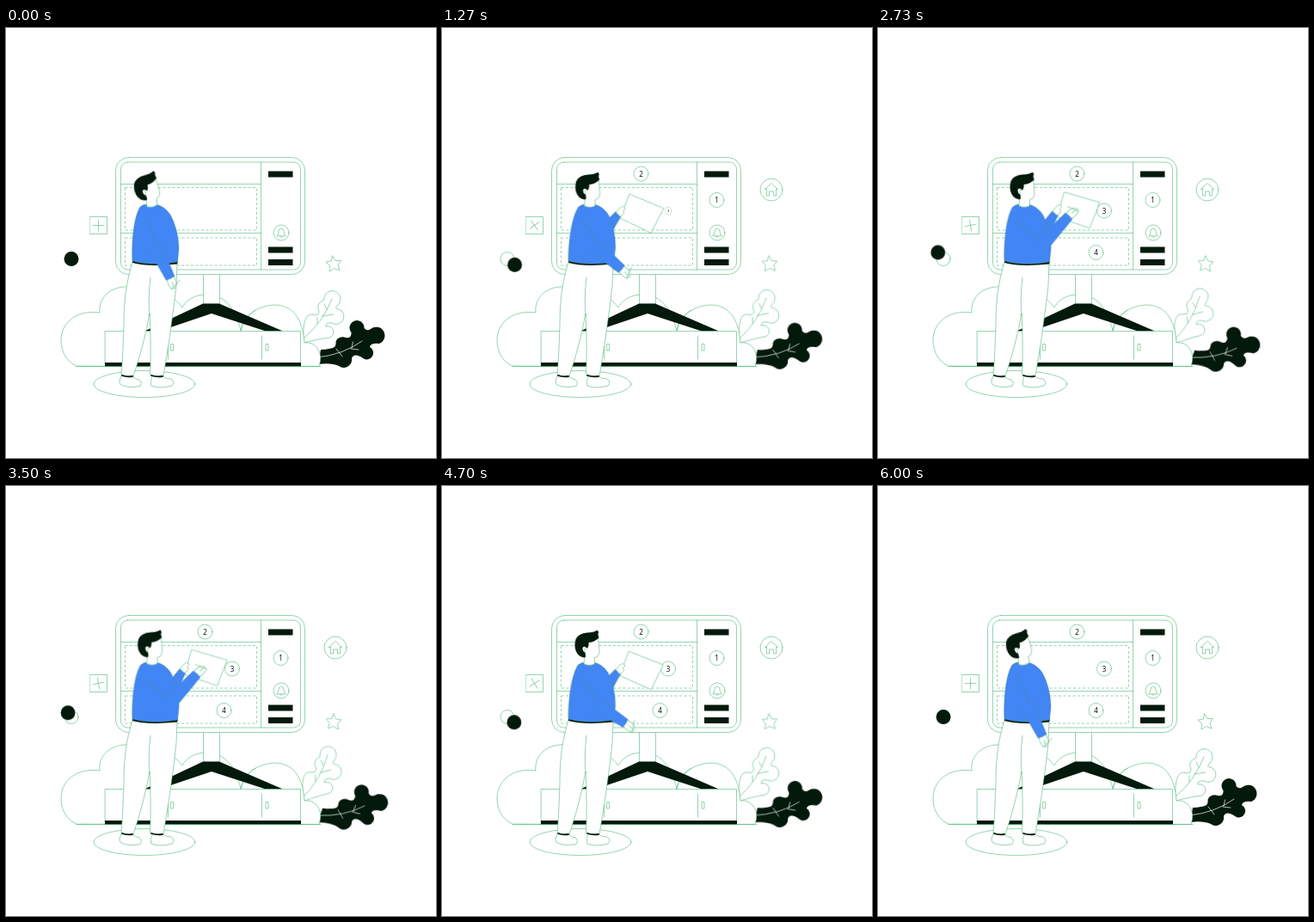
These frames come from a looping animation (500x500 px, 6.03 s). An HTML page without scripts:

```html
<!DOCTYPE html>
<html lang="en">
<head>
<meta charset="utf-8">
<title>Planning a layout</title>
<style>
html, body { margin: 0; width: 100%; height: 100%; overflow: hidden; background: #fff; }
svg { display: block; width: 100%; height: 100%; }
.line { fill: none; stroke: #3bb36b; stroke-width: .55; stroke-linejoin: round; stroke-linecap: round; }
.white { fill: #fff; }
.dark { fill: #02190b; stroke: none; }
.blue { fill: #4285f4; stroke: #3f8f8a; stroke-width: .5; }
.vein { stroke: #fff; stroke-width: .7; }
text { font: 8px "Noto Sans", "Open Sans", sans-serif; fill: #02190b; text-anchor: middle; }

/* everything swings forth and back, half a loop each way */
.sway { animation: 3.015s ease-in-out infinite alternate; }
.leaf { animation-name: leaf; transform-origin: 362px 388px; }
.frond { animation-name: frond; transform-origin: 350px 362px; }
.dot { animation-name: dot; }
.plus { animation-name: plus; transform-origin: 107.5px 229.5px; }
.star { animation-name: star; transform-origin: 381px 273.5px; }
.torso { animation-name: torso; transform-origin: 174px 272px; }
.head { animation-name: head; transform-origin: 168px 203px; }
.hold { animation-name: hold; transform-origin: 178px 230px; }
.write { animation-name: write; }
.seam { animation-name: seam; }

@keyframes leaf { to { transform: rotate(9deg); } }
@keyframes frond { to { transform: rotate(-6deg); } }
@keyframes dot {
  0%, 66.67% { transform: none; }
  33.33% { transform: translate(10px, 8px); }
  100% { transform: translate(-7.5px, -9px); }
}
@keyframes plus {
  0% { transform: none; }
  33.33% { transform: rotate(48deg); }
  60%, 100% { transform: rotate(79deg); }
}
@keyframes star { to { transform: rotate(10deg); } }
@keyframes torso {
  0% { transform: none; }
  27% { transform: skewX(-4.3deg); }
  57.4%, 100% { transform: skewX(-.6deg); }
}
@keyframes head {
  0% { transform: rotate(-11deg); }
  27% { transform: translate(5px, 0) rotate(1deg); }
  57.4% { transform: none; }
  59.7% { transform: translate(-.5px, -1px); }
  100% { transform: translate(1px, 0) rotate(1deg); }
}
@keyframes hold {
  0% { transform: rotate(118deg); animation-timing-function: ease-in; }
  25.5% { transform: rotate(29.5deg); animation-timing-function: linear; }
  28.5% { transform: rotate(18.5deg); animation-timing-function: ease-out; }
  57.4% { transform: none; }
  100% { transform: translate(3px, 2px); }
}
@keyframes write {
  0% { transform: translate(173.6px, 255px) rotate(64deg); }
  27% { transform: translate(171.6px, 256px) rotate(72deg); animation-timing-function: ease-in; }
  57.4% { transform: translate(193px, 251px) rotate(-29deg); animation-timing-function: linear; }
  59.7% { transform: translate(193px, 249.5px) rotate(-40deg); animation-timing-function: ease-out; }
  70% { transform: translate(194.5px, 248px) rotate(-47deg); }
  100% { transform: translate(194.7px, 248px) rotate(-47deg); }
}
@keyframes seam {
  0%, 27% { transform: translate(162px, 222px) rotate(70deg); }
  57.4%, 100% { transform: translate(162px, 226px) rotate(44deg); }
}

.pop { transform-box: fill-box; transform-origin: center; animation: 6.03s linear infinite; }
.one { animation-name: one; }
.two { animation-name: two; }
.three { animation-name: three; }
.four { animation-name: four; }
.home { animation-name: home; }
@keyframes one { 0%, 2.8% { transform: scale(0); } 6.1%, 100% { transform: none; } }
@keyframes two { 0%, 11.1% { transform: scale(0); } 14.4%, 100% { transform: none; } }
@keyframes home { 0%, 16% { transform: scale(0); } 19.4%, 100% { transform: none; } }
@keyframes three { 0%, 19.5% { transform: scale(0); } 22.8%, 100% { transform: none; } }
@keyframes four { 0%, 28% { transform: scale(0); } 31.3%, 100% { transform: none; } }
</style>
</head>
<body>
<svg viewBox="0 0 500 500" class="line">
  <!-- plants and clouds -->
  <g class="sway frond">
    <path class="white" d="M346 366Q344 332 356 333Q364 336 364 329A8 8 0 0 1 369 317Q370 317 370 314A9.5 9.5 0 1 1 386 322Q381 327 387 327A9 9 0 1 1 379 343Q371 342 372 347A6.5 6.5 0 0 1 376 360Q366 361 346 366Z"/>
    <path d="M346 361Q368 343 379 315M362 344V337M368 335L381 333M373 327L370 321"/>
  </g>
  <g class="sway leaf">
    <path class="dark" d="M363 391L366 374Q377 373.500 382 371Q384 369 383.500 365A8 7 0 0 1 395 360Q402 361 401.500 354A8.500 8.500 0 1 1 416.500 349Q420 353 424 350A10 10 0 1 1 434 367Q424 366 423 371A7.500 7.500 0 1 1 416 384.500Q405 377 402 384A9.500 9.500 0 0 1 387 393Q378 389 363 391Z"/>
    <path class="vein" d="M362 383Q392 380 414 364M388 378L384 373M402 372L403.500 365M388 378L391 382M401 373L410 374"/>
  </g>
  <path class="white" d="M82 393C70 388 64 376 64 363C64 343 82 327 109 331C107 315 120 299 145 301C165 301 190 305 205 325C212 312 228 308 240 311C254 313 266 324 273 352C278 334 292 323 312 322C332 322 345 336 347 366C360 364 370 378 364 393Z"/>
  <path d="M273 352C274 342 282 332 290 328"/>

  <!-- stand and cabinet -->
  <path class="white" d="M229.500 286V321H248.500V286Z"/>
  <path class="dark" d="M229 320.500H248L322 352.500H302L239 332L178 352.500H161Z"/>
  <path class="white" d="M115.500 352.500H342.500V391H115.500Z"/>
  <path class="dark" d="M115 389H343V393.500H115Z"/>
  <path d="M188.500 358V385M297.500 358V385M192 367.500H194.500V375H192ZM302.500 367.500H305V375H302.500ZM82 393.500H366"/>

  <!-- screen -->
  <rect class="white" x="127.500" y="150.500" width="220" height="136" rx="15"/>
  <rect x="133.500" y="156" width="209" height="125" rx="8"/>
  <path d="M296.500 156V281M133.500 181.500H296.500M133.500 238.500H296.500"/>
  <path stroke-dasharray="3 2.500" stroke-linecap="butt" d="M138.500 185.500H291.500V235H138.500ZM138.500 244H291.500V276H138.500Z"/>
  <path class="dark" d="M305 166.500H333.500V173.500H305ZM305 254.500H333.500V261.500H305ZM305 269H333.500V276H305Z"/>
  <circle cx="320" cy="238" r="9"/>
  <path d="M315 241.500Q317 239.500 317 236.500Q317 233.500 320 233Q323 233.500 323 236.500Q323 239.500 325 241.500ZM318.500 242.500Q320 244.500 321.500 242.500"/>
  <g stroke="none">
    <g class="pop one"><circle class="line" cx="319.500" cy="200" r="8.500"/><text x="319.500" y="203">1</text></g>
    <g class="pop two"><circle class="line" cx="231.500" cy="169.500" r="8.500"/><text x="231.500" y="172.500">2</text></g>
    <g class="pop three"><circle class="line" cx="263" cy="212.500" r="8.500"/><text x="263" y="215.500">3</text></g>
    <g class="pop four"><circle class="line" cx="253.500" cy="261" r="8.500"/><text x="253.500" y="264">4</text></g>
  </g>

  <!-- floating marks -->
  <g class="pop home">
    <circle cx="383" cy="188" r="13"/>
    <path d="M375.500 187.500L383 180.500L390.500 187.500H388.500V195H385.500V190H380.500V195H377.500V187.500Z"/>
  </g>
  <path class="sway star" d="M379.500 265L383 270.500L389.500 270.500L386 275.500L388 282L381.500 279.500L376 283L376.500 276.500L372 272L378 271Z"/>
  <rect x="97.500" y="219.500" width="20" height="20"/>
  <path class="sway plus" d="M101 229.500H114M107.500 223V236"/>
  <circle cx="76" cy="268.500" r="8"/>
  <circle class="dark sway dot" cx="76" cy="268.500" r="8.400"/>

  <!-- person -->
  <ellipse cx="161" cy="414" rx="59" ry="15.500"/>
  <g class="sway hold">
    <path class="white" d="M214 189L255 201L243.500 231L206 218Z"/>
    <path class="blue" d="M180 235L200 211L206.500 216L196 240Z"/>
    <path class="white" d="M200.500 211.500Q203 206 208 203.500L211 206L208.500 209L210 211Q208 216 205.500 216Z"/>
  </g>
  <path class="white" d="M134 405Q130 412 134 415Q142 419 156 416.500Q159 412 155 409Q150 408 147 405ZM170 405Q167 411 169 416Q178 420 193 416Q197 411 192 408Q185 408 182 405Z"/>
  <path class="white" d="M147 272C140 296 137 315 137 345Q136 380 134 403Q140 406 148 405Q160 370 167 332Q169 370 167.500 403Q174 406 183 405Q190 365 195 325Q199 300 199 272Z"/>
  <path d="M168 290Q165 315 167 334"/>
  <path stroke="#02190b" stroke-width="1.800" d="M135 404Q140 406 147 405M169 404Q175 406 182 405"/>
  <path class="dark" d="M147.500 269Q165 273 200 271L199 274.500Q165 278 147 273Z"/>
  <g class="sway torso">
    <path class="blue" d="M147 271C146 248 148.500 220 156 208Q160 204.500 165 205H174Q184 207 191 217Q200 233 201 256L199.500 272Q170 277 147 271Z"/>
  </g>
  <path class="sway seam" d="M0 0Q16 -3 34 -3" stroke="#3f8f8a" stroke-width=".500"/>
  <g class="sway write">
    <path class="white" d="M39 -4Q46 -6 51 -2Q55 2 50 5Q44 6 39 4Z"/>
    <path d="M47 -9L52 5M45 0L51 1"/>
    <path class="blue" stroke-opacity=".600" d="M0 -8L40 -5.500Q41 0 40 5.500L0 8"/>
  </g>
  <g class="sway head">
    <path class="white" d="M164 196L163 207Q169 210 175.500 207V199.500Q180 199 180.500 195L181 191L179.500 177H165Z"/>
    <path class="dark" d="M178.500 167.500Q174 170.500 167 170.500Q157 171 153.500 178Q151.500 184 153 190Q155 197 161 199Q164 200 165 198.500L164.500 194Q161 192 161.500 188Q164 185 166.500 189Q169 187 168.500 182Q176 181.500 180.500 176Q178.500 173 180 170Z"/>
  </g>
</svg>
</body>
</html>
```
